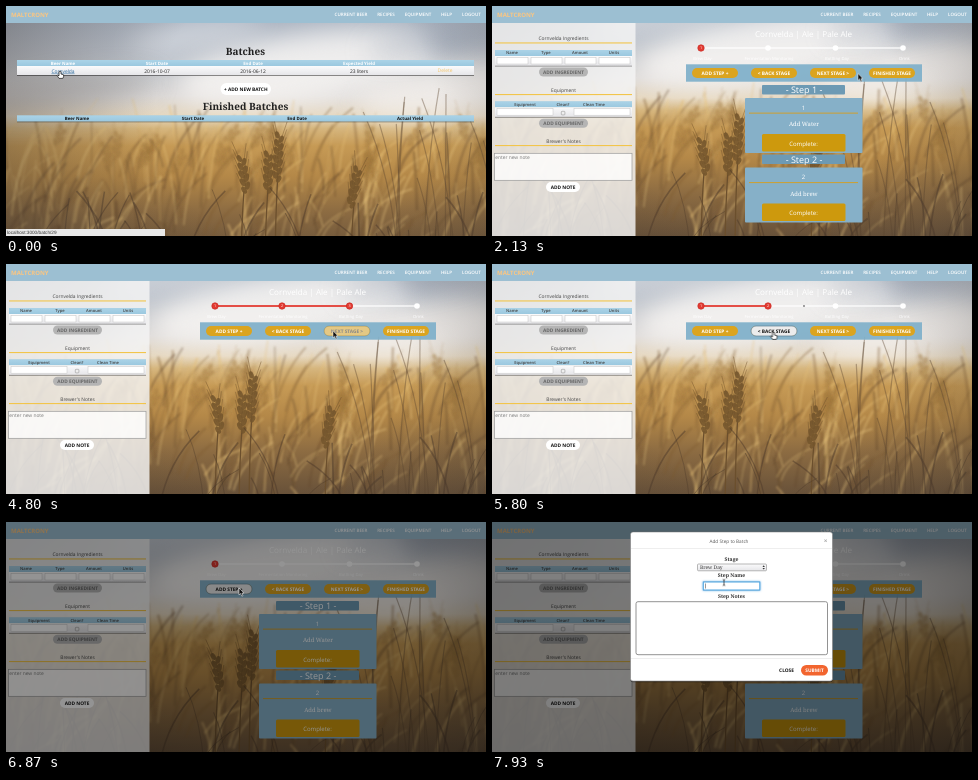
Animation, 480 px wide and 230 px high, one loop 8000 ms. Source, as an HTML page with a canvas:

```html
<!DOCTYPE html>
<html lang="en">
<head>
<meta charset="utf-8">
<title>Brewing batches</title>
<style>
html, body { margin: 0; width: 100%; height: 100%; overflow: hidden; background: #8a7050; }
#stage { position: relative; width: 480px; height: 230px; max-width: 100%; max-height: 100%; overflow: hidden; contain: strict; }
canvas, svg { position: absolute; left: 0; top: 0; display: block; }
svg { width: 480px; height: 230px; overflow: hidden; }
text { font-family: "Open Sans", sans-serif; text-rendering: geometricPrecision; }
.serif { font-family: "Noto Serif", serif; }
.status { font-family: "Liberation Sans", Arial, sans-serif; }

canvas, .a { animation: 8s linear infinite both; }
canvas { animation-name: field; animation-timing-function: step-end; }
.cut { animation-timing-function: step-end; }
#list { animation-name: list; }
#detail { animation-name: detail; }
#steps { animation-name: steps; }
#fill { animation-name: fill; transform-origin: 209px 42px; }
#dot2 { animation-name: dot2; }
#dot3 { animation-name: dot3; }
#speck { animation-name: speck; }
#next { animation-name: next; }
#back { animation-name: back; }
#add { animation-name: add; }
#shade { animation-name: shade; }
#modal { animation-name: modal; }
#focus { animation-name: focus; }
#cursor { animation-name: move; animation-timing-function: ease-in-out; }
#hand { animation-name: hand; }
#arrow { animation-name: arrow; }
#beam { animation-name: beam; }

@keyframes field { 0% { transform: none } 7%, 100% { transform: translate(-26px, -18px) } }
@keyframes list { 0% { opacity: 1 } 7%, 100% { opacity: 0 } }
@keyframes detail { 0% { opacity: 0 } 7%, 100% { opacity: 1 } }
@keyframes steps { 0% { opacity: 1 } 36.5% { opacity: 0 } 77%, 100% { opacity: 1 } }
@keyframes fill {
  0%, 36.5% { transform: scaleX(0) } 40%, 52.5% { transform: scaleX(.332) }
  56%, 68.5% { transform: scaleX(.663) } 72%, 77% { transform: scaleX(.332) }
  80%, 100% { transform: scaleX(0) }
}
@keyframes dot2 { 0% { opacity: 0 } 39% { opacity: 1 } 78%, 100% { opacity: 0 } }
@keyframes dot3 { 0% { opacity: 0 } 55% { opacity: 1 } 69%, 100% { opacity: 0 } }
@keyframes speck { 0% { opacity: 0 } 71% { opacity: 1 } 75%, 100% { opacity: 0 } }
@keyframes next { 0%, 30% { opacity: 0 } 33%, 58% { opacity: 1 } 62%, 100% { opacity: 0 } }
@keyframes back { 0%, 61% { opacity: 0 } 64%, 79.4% { opacity: 1 } 85.6%, 100% { opacity: 0 } }
@keyframes add { 0%, 81% { opacity: 0 } 83.5%, 100% { opacity: 1 } }
@keyframes shade { 0%, 83.6% { opacity: 0 } 86.3%, 100% { opacity: .5 } }
@keyframes modal {
  0%, 86.25% { opacity: 0; transform: translateY(-37px); animation-timing-function: ease-out }
  88.1% { opacity: .86; transform: translateY(-11px); animation-timing-function: ease-out }
  90%, 100% { opacity: 1; transform: none }
}
@keyframes focus { 0%, 94% { opacity: 0 } 96%, 100% { opacity: 1 } }
@keyframes move {
  0%, 8% { transform: translate(54px, 65px) }
  24%, 28% { transform: translate(366px, 67.5px) }
  32%, 57% { transform: translate(355px, 66px) }
  64%, 78% { transform: translate(281.5px, 68px) }
  83%, 88% { transform: translate(233px, 66px) }
  93%, 100% { transform: translate(232px, 60.5px) }
}
@keyframes hand {
  0% { opacity: 1 } 8.1% { opacity: 0 } 30.5% { opacity: 1 } 59% { opacity: 0 }
  62% { opacity: 1 } 80% { opacity: 0 } 81.5% { opacity: 1 } 83.5%, 100% { opacity: 0 }
}
@keyframes arrow {
  0% { opacity: 0 } 8.1% { opacity: 1 } 30.5% { opacity: 0 } 59% { opacity: 1 }
  62% { opacity: 0 } 80% { opacity: 1 } 81.5% { opacity: 0 } 83.5% { opacity: 1 }
  91%, 100% { opacity: 0 }
}
@keyframes beam { 0% { opacity: 0 } 91%, 100% { opacity: 1 } }
</style>
</head>
<body>
<div id="stage">
<canvas width="520" height="260"></canvas>
<svg viewBox="0 0 480 230">
  <defs>
    <linearGradient id="head" x2="0" y2="1"><stop stop-color="#abd3e7"/><stop offset="1" stop-color="#9bc8df"/></linearGradient>
    <linearGradient id="row" x2="0" y2="1"><stop stop-color="#fbfbfc"/><stop offset="1" stop-color="#e6e6e9"/></linearGradient>
    <filter id="drop" x="-10%" y="-20%" width="120%" height="160%"><feDropShadow dx="0" dy=".8" stdDeviation=".7" flood-opacity=".55"/></filter>
    <filter id="glow" x="-20%" y="-80%" width="140%" height="260%"><feDropShadow dx="0" dy="0" stdDeviation="1.2" flood-color="#66afe9"/></filter>
  </defs>
  <g id="ui"></g>
  <g id="cursor" class="a">
    <path id="hand" class="a cut" d="M-1 .8Q0-.8 1 .8V3L3.6 3.8V5.8L2.8 7.4H-1L-2.9 4.5-2.3 3.9-1 4.8Z" fill="#fff" stroke="#111" stroke-width=".7"/>
    <path id="arrow" class="a cut" d="M0 0V7L1.6 5.5 2.8 8.2 4 7.7 2.9 5.1H5Z" fill="#111" stroke="#fff" stroke-width=".5"/>
    <path id="beam" class="a cut" d="M-1.3-3Q0-3 0-2 0-3 1.3-3M0-2V2M-1.3 3Q0 3 0 2 0 3 1.3 3" fill="none" stroke="#222" stroke-width=".7"/>
  </g>
</svg>
</div>
<script>
// Blurred wheat field behind the pages
const ctx = document.querySelector('canvas').getContext('2d');
let seed = 29;
const rnd = (a = 0, b = 1) => {
  seed = (seed * 16807) % 2147483647;
  return a + (b - a) * seed / 2147483647;
};

function wash(gradient, stops) {
  stops.forEach(([at, color]) => gradient.addColorStop(at, color));
  ctx.fillStyle = gradient;
  ctx.fillRect(0, 0, 520, 260);
}

function cloud(x, y, rx, ry, color) {
  ctx.fillStyle = color;
  ctx.beginPath();
  ctx.ellipse(x, y, rx, ry, -.15, 0, 7);
  ctx.fill();
}

function stalk(x, y, height, lean, color, width) {
  ctx.strokeStyle = color;
  ctx.lineWidth = width;
  ctx.beginPath();
  ctx.moveTo(x, y);
  ctx.quadraticCurveTo(x + lean * .2, y - height * .6, x + lean, y - height);
  ctx.stroke();
}

function ear(x, y, length, tilt, color) {
  ctx.save();
  ctx.translate(x, y);
  ctx.rotate(tilt);
  ctx.fillStyle = ctx.strokeStyle = color;
  ctx.lineWidth = .5;
  for (let d = 0; d < length; d += 4) {
    const side = d / 4 % 2 ? 1 : -1;
    const size = 1.1 - .4 * Math.abs(d / length - .5);
    ctx.beginPath();
    ctx.ellipse(side * 2, d - length / 2, 2.5 * size, 4.2 * size, side * .4, 0, 7);
    ctx.fill();
    ctx.beginPath();
    ctx.moveTo(side * 2, d - length / 2);
    ctx.lineTo(side * 7, d - length / 2 - 18);
    ctx.stroke();
  }
  ctx.restore();
}

function paintField() {
  wash(ctx.createLinearGradient(0, 0, 0, 250), [
    [0, '#a3adbc'], [.2, '#bcc2cb'], [.36, '#dcd9d7'], [.44, '#e6d8c0'], [.49, '#d6b67e'],
    [.56, '#c69a55'], [.68, '#b48848'], [.82, '#8d6c42'], [1, '#665039']]);
  ctx.filter = 'blur(12px)';
  cloud(300, 62, 130, 34, '#fbf8f5cc');
  cloud(440, 85, 90, 26, '#f6f2eebb');
  cloud(190, 28, 70, 10, '#ffffff77');
  cloud(60, 88, 90, 16, '#a5a5a877');
  cloud(430, 35, 70, 10, '#8f9aab77');
  ctx.filter = 'blur(.9px)';
  for (let i = 0; i < 260; i++) {
    const tone = ['#e3bd7577', '#5d432866', '#edca8366', '#7d5b3166'][i % 4];
    stalk(rnd(-20, 520), rnd(160, 275), rnd(25, 85), rnd(-15, 42), tone, rnd(.8, 2.4));
  }
  for (let i = 0; i < 24; i++) ear(rnd(0, 520), rnd(122, 165), rnd(16, 26), rnd(-.3, .8), '#a1783f66');
  ctx.filter = 'blur(.4px)';
  [[262, 168, 40, .02], [272, 152, 46, .06], [238, 170, 36, -.15], [348, 182, 38, .2]].forEach(([x, y, length, tilt]) => {
    stalk(x - 3, 260, 245 - y, 3, '#6b4f2d', 1.3);
    ear(x, y, length, tilt, '#73552ddd');
  });
  for (let i = 0; i < 45; i++) stalk(rnd(-10, 510), 262, rnd(30, 80), rnd(-40, 40), '#4b392a77', rnd(.8, 1.8));
  for (let i = 0; i < 14; i++) stalk(rnd(380, 500), 262, rnd(90, 180), rnd(-45, 20), '#5d463066', 1.2);
  ctx.filter = 'none';
  wash(ctx.createRadialGradient(290, 105, 140, 290, 105, 350), [[0, '#3a343000'], [1, '#3a343077']]);
}

// Interface, in stage pixels
const text = (s, x, y, size, fill = '#fff', more = '') =>
  `<text x="${x}" y="${y}" font-size="${size}" fill="${fill}" text-anchor="middle" ${more}>${s}</text>`;
const box = (x, y, w, h, fill, more = '') =>
  `<rect x="${x}" y="${y}" width="${w}" height="${h}" fill="${fill}" ${more}/>`;
const group = (id, body, kind = 'a cut') => `<g id="${id}" class="${kind}">${body}</g>`;
const bold = 'font-weight="700"', semi = 'font-weight="600"', left = 'style="text-anchor:start"';
const shadow = 'filter="url(#drop)"', serif = 'class="serif"';
const pill = (s, x, y, w, h, fill, ink, more = '') =>
  box(x, y, w, h, fill, `rx="${h / 2}" ${more}`) + text(s, x + w / 2, y + h / 2 + 1.8, 4.8, ink, bold);
const labels = (list, y, size, fill, more = semi) =>
  list.map(([s, x]) => text(s, x, y, size, fill, more)).join('');
const field = (x, y, w, h) => box(x, y, w, h, '#fff', 'stroke="#c4c4c4" stroke-width=".5"');

const beer = 'Cornvelda', gold = '#dba41f';

const nav = box(0, 0, 480, 17, '#9cbfd2') +
  text('MALTCRONY', 5, 10.6, 6, '#fbc681', `${bold} ${left}`) +
  labels([['CURRENT BEER', 345], ['RECIPES', 380], ['EQUIPMENT', 412], ['HELP', 440.5], ['LOGOUT', 465.5]], 10.3, 4.55, '#fff');

const list = group('list',
  text('Batches', 239.5, 49, 10, '#222', `${serif} ${semi}`) +
  `<g ${shadow}>${box(11, 54, 457, 6, 'url(#head)')}${box(11, 60, 457, 9, 'url(#row)')}</g>` +
  labels([['Beer Name', 57], ['Start Date', 151], ['End Date', 247], ['Expected Yield', 353]], 58.7, 4.4, '#fff', bold) +
  text(beer, 57, 66.6, 4.9, '#2b6a9d', 'text-decoration="underline"') +
  labels([['2016-10-07', 151], ['2016-06-12', 247], ['23 liters', 353]], 66.6, 4.9, '#222', '') +
  text('Delete', 439, 66.4, 4.9, '#f3c56a') +
  pill('+ ADD NEW BATCH', 214.5, 77, 50.5, 12, '#fff', '#111') +
  text('Finished Batches', 239.5, 104, 10, '#222', `${serif} ${semi}`) +
  box(11, 109.3, 457, 6, 'url(#head)', shadow) +
  labels([['Beer Name', 71], ['Start Date', 187], ['End Date', 291], ['Actual Yield', 404]], 114, 4.4, '#111', bold) +
  box(0, 223, 159, 7, '#e8e8e8') +
  text('localhost:3000/batch/29', 1, 228, 4.7, '#333', `${left} class="status"`));

const heading = (s, y) => text(s, 71.5, y, 4.9, '#444') + box(3, y + 2.2, 137, 1.1, '#f2c54b');
const table = (y, names, inputs) =>
  `<g ${shadow}>${box(3, y, 137, 6, 'url(#head)')}${box(3, y + 6, 137, 9.5, 'url(#row)')}</g>` +
  labels(names, y + 4.3, 4.1, '#444') + inputs.map(([x, w]) => field(x, y + 7.5, w, 6.5)).join('');

const sidebar = box(0, 17, 143.5, 213, '#f4f4f5', 'opacity=".83"') +
  heading(`${beer} Ingredients`, 34.2) +
  table(44, [['Name', 20], ['Type', 54], ['Amount', 88], ['Units', 122]], [[5, 31], [39, 31], [73, 31], [107, 31]]) +
  pill('ADD INGREDIENT', 47, 61.5, 49, 9, '#b4b4b4', '#666') +
  heading('Equipment', 85.8) +
  table(95.2, [['Equipment', 33], ['Clean?', 71], ['Clean Time', 102]], [[5, 56], [82, 56]]) +
  box(69.3, 105.3, 3.6, 3.6, '#eee', 'rx=".7" stroke="#888" stroke-width=".5"') +
  pill('ADD EQUIPMENT', 47, 112.8, 49, 9, '#b4b4b4', '#666') +
  heading("Brewer's Notes", 136.8) +
  box(2.5, 147.3, 137.5, 27, '#fff', 'stroke="#999" stroke-width=".7" fill-opacity=".8"') +
  text('enter new note', 3.2, 152.6, 4.9, '#777', left) +
  pill('ADD NOTE', 54, 176, 34, 10, '#fff', '#111');

const dot = (x, n) => `<circle cx="${x}" cy="42" r="3.2" fill="#e23b32" stroke="#c92a25" stroke-width=".7"/>` + text(n, x, 43.4, 3.8);
const progress = box(209, 41.4, 202, 1.2, '#fff') +
  [276, 343.5, 411].map(x => `<circle cx="${x}" cy="42" r="2.8" fill="#fff"/>`).join('') +
  `<rect id="fill" class="a" x="209" y="41.1" width="202" height="1.8" fill="#e23b32"/>` +
  dot(209, 1) + group('dot2', dot(276, 2)) + group('dot3', dot(343.5, 3)) +
  group('speck', '<circle cx="312" cy="42" r=".9" fill="#777"/>') +
  labels([['Brew Day', 210.5], ['Fermentation Monitoring', 277], ['Bottling Day', 345], ['Drink', 412.5]], 53.6, 4.2, '#fff', '');

const action = (s, x, id) => pill(s, x, 62, 46, 10, gold, '#fff') +
  (id ? group(id, pill(s, x, 62, 46, 10, '#ececec', '#111', 'stroke="#5d7f92" stroke-width=".7"'), 'a') : '');
const actions = box(194, 58.3, 236, 17.4, '#7fb0ca', 'opacity=".93"') +
  action('ADD STEP +', 200, 'add') + action('&lt; BACK STAGE', 259, 'back') +
  action('NEXT STAGE &gt;', 318, 'next') + action('FINISHED STAGE', 377);

const step = (n, name, y) => `<g transform="translate(0 ${y})">` +
  box(270, 79, 83, 9.6, '#6d9ab4', 'rx="1"') + text(`- Step ${n} -`, 312, 87, 9) +
  box(253, 92, 117.5, 55, '#86b0c8', 'rx="1"') + text(n, 311.5, 103.5, 6) +
  box(257, 106.6, 109, 1, '#cfa02e') + text(name, 312, 120, 5.9, '#fff', serif) +
  box(270, 128, 83.5, 17.5, '#cd990d', 'rx="1.5"') + text('Complete:', 311.5, 139.8, 6) + '</g>';

const detail = group('detail', sidebar +
  text(`${beer} | Ale | Pale Ale`, 311.5, 30.7, 8.1) + progress + actions +
  group('steps', step(1, 'Add Water', 0) + step(2, 'Add brew', 69.5)));

const caption = (s, y) => text(s, 239.5, y, 5.1, '#333', `${serif} ${semi}`);
const modal = group('modal',
  box(138.5, 10, 202, 149, '#fff', `rx="2.5" stroke="#777" stroke-width=".5" ${shadow}`) +
  text('Add Step to Batch', 237, 20.5, 4.7, '#555') + text('×', 333.5, 20.5, 6.5, '#aaa', bold) +
  box(139, 26, 201, .5, '#ddd') +
  caption('Stage', 38.8) +
  box(205.5, 42, 69, 6.8, 'url(#row)', 'rx="1" stroke="#888" stroke-width=".6"') +
  text('Brew Day', 208, 47.3, 4.9, '#333', 'class="serif" style="text-anchor:start"') +
  '<path d="M270.5 44.9l1.2-1.6 1.2 1.6zM270.5 46l1.2 1.6 1.2-1.6z" fill="#333"/>' +
  caption('Step Name', 55.3) +
  box(211.3, 60, 56.5, 8, '#fff', 'stroke="#aaa" stroke-width=".6"') +
  group('focus', box(211.3, 60, 56.5, 8, '#fff', 'stroke="#4fa5e0" filter="url(#glow)"') + box(213, 61.5, .5, 5, '#333'), 'a') +
  caption('Step Notes', 76.4) +
  box(144, 79.7, 191.5, 53, '#fff', 'rx="2" stroke="#777" stroke-width=".8"') +
  box(139, 136.3, 201, .5, '#ddd') +
  text('CLOSE', 294.5, 150.2, 4.8, '#111', bold) +
  pill('SUBMIT', 309, 143, 27, 10.5, '#f2652f', '#fff'), 'a');

paintField();
document.getElementById('ui').innerHTML = nav + list + detail +
  '<rect id="shade" class="a" width="480" height="230"/>' + modal;
</script>
</body>
</html>
```
